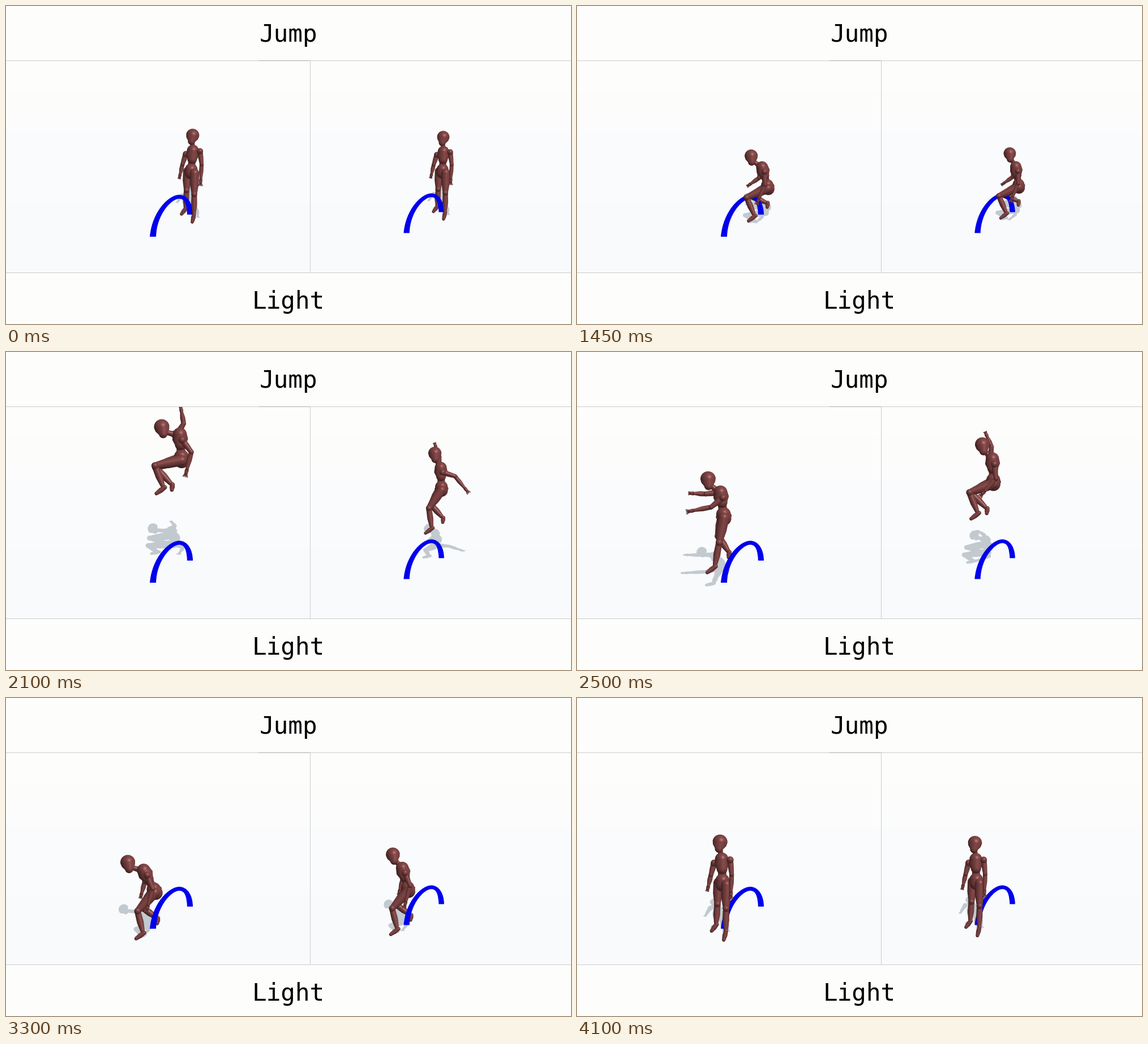
A matplotlib script for the animation above (4150 ms loop, 998 px wide and 561 px high).

```python
import numpy as np
import matplotlib.pyplot as plt
from matplotlib.animation import FuncAnimation
from matplotlib.patches import PathPatch
from matplotlib.path import Path

W, H, DPI = 998, 561, 100
FRAMES, STEP = 83, 50
TOP, BOTTOM, SPLIT = 96, 470, 537
WIN_W, WIN_H = 200, 345
SKIN = np.array([128, 69, 69]) / 255
SHADOW = np.array([194, 201, 207]) / 255
LIGHT = np.array([0.35, -0.55, 0.76])
HALF = np.array([0.19, -0.29, 0.94])
SQUASH = 0.92       # vertical foreshortening of the camera
THIGH, SHIN = 41, 39

# crouch (px), turn to the side, then angles in degrees from straight up,
# growing towards the left: spine, neck, near arm x2, far arm x2
POSES = np.array([
    (0, 0.0, -5, 0, 187, 177, 162, 167),     # stand
    (9, 0.9, 4, 14, 202, 162, 172, 170),     # turn
    (28, 1.0, 16, 40, 182, 157, 173, 125),   # crouch
    (0, 1.0, 4, 25, 262, 235, 20, 30),       # take off
    (0, 1.0, 4, 60, 212, 160, -30, 10),      # tuck
    (0, 1.0, 9, 36, 124, 98, 115, 100),      # land
    (15, 1.0, 28, 58, 202, 165, 190, 165),   # settle
    (0, 0.0, 2, 5, 186, 178, 165, 167),      # stand again
])


def v(x, y):
    return np.array([x, y], float)


def along(a, b, u):
    return a + (b - a) * u


def polar(deg, length):
    a = np.radians(deg)
    return -length * v(np.sin(a), np.cos(a))


def smooth_keys(times, rows, t):
    """Monotone cubic interpolation through the key rows."""
    times = np.asarray(times, float)
    d = np.diff(rows, axis=0) / np.diff(times)[:, None]
    a, b = d[:-1], d[1:]
    same = a * b > 0
    m = np.zeros_like(rows)
    m[1:-1] = np.where(same, 2 * a * b / np.where(same, a + b, 1), 0)
    i = min(np.searchsorted(times, t, "right") - 1, len(times) - 2)
    h = times[i + 1] - times[i]
    u = (t - times[i]) / h
    return ((1 + 2 * u) * (1 - u) ** 2 * rows[i] + u * (1 - u) ** 2 * h * m[i]
            + u * u * (3 - 2 * u) * rows[i + 1] + u * u * (u - 1) * h * m[i + 1])


def bend_knee(hip, ankle, thigh, shin):
    """Two-bone reach with the knee pointing forward (left)."""
    d = (ankle - hip) / (1, SQUASH)
    reach = np.hypot(*d)
    s = (thigh ** 2 - shin ** 2 + reach ** 2) / (2 * reach)
    if reach > thigh + shin:
        s = reach / 2
    off = np.sqrt(max(thigh ** 2 - s ** 2, 0)) if reach < thigh + shin else 0
    return hip + (d * s + v(-d[1], d[0]) * off) / reach * (1, SQUASH)


def leg(hip, ankle, toe, size, short=1):
    knee = bend_knee(hip, ankle, THIGH * size * short, SHIN * size * short)
    heel = along(ankle, ankle + toe, -0.15)
    return [(hip, knee, (8.2, 7.8, 4.8)),
            (knee, ankle, (4.8, 5.3, 2.9)),
            (knee, knee, (5.1,) * 3),
            (heel, ankle + toe, (3.3, 3.9, 2.8))]


def arm(shoulder, upper, fore, size, lengths):
    elbow = shoulder + polar(upper, lengths[0] * size)
    hand = elbow + polar(fore, lengths[1] * size)
    wrist, palm = along(elbow, hand, 0.68), along(elbow, hand, 0.84)
    d = hand - palm
    side = v(-d[1], d[0]) * 0.5
    fingers = [(palm, hand + side * k, (1.6, 1.4, 0.9)) for k in (-1, 0, 1)]
    return fingers + [(wrist, palm, (2.3, 3.0, 2.6)),
                      (elbow, wrist, (3.6, 3.8, 2.3)),
                      (shoulder, elbow, (4.8, 4.5, 3.5)),
                      (shoulder, shoulder, (5.4,) * 3)]


def trunk(pelvis, chest, head, chin):
    spine = pelvis - chest
    return [(chest, pelvis, (7, 6.5, 6.5)),
            (along(pelvis, chest, 0.08), pelvis + 0.12 * spine, (11, 12.2, 11)),
            (chest, along(chest, head, 0.35), (9.5, 8, 5)),
            (along(chest, head, 0.3), along(head, chin, 0.6), (4.2, 4, 4)),
            (chest - 0.16 * spine, chest + 0.32 * spine, (10.5, 11.8, 8.5)),
            (head, chin, (11.6, 10.4, 6.4))]


def paint(buf, a, b, radii, flat=None):
    """Composite one shaded tapered capsule into a premultiplied buffer."""
    pad = max(radii) + 2
    x0, y0 = np.maximum(np.floor(np.minimum(a, b) - pad), 0).astype(int)
    x1, y1 = np.minimum(np.ceil(np.maximum(a, b) + pad), (WIN_W, WIN_H)).astype(int)
    if x1 <= x0 or y1 <= y0:
        return
    y, x = np.mgrid[y0:y1, x0:x1] + 0.5
    d = b - a
    t = np.clip(((x - a[0]) * d[0] + (y - a[1]) * d[1]) / (d @ d + 1e-9), 0, 1)
    ox, oy = x - a[0] - t * d[0], y - a[1] - t * d[1]
    r = np.interp(t, [0, 0.5, 1], radii)
    dist = np.hypot(ox, oy)
    alpha = np.clip(r - dist + 0.5, 0, 1)[..., None]
    color = flat
    if flat is None:
        k = 1 / np.maximum(r, dist)
        n = np.stack([ox * k, oy * k], -1)
        nz = np.sqrt(np.clip(1 - (n ** 2).sum(-1, keepdims=True), 0, 1))
        n = np.concatenate([n, nz], -1)
        diffuse = np.clip(n @ LIGHT, 0, 1)[..., None]
        gloss = np.clip(n @ HALF, 0, 1)[..., None] ** 40
        color = np.clip(SKIN * (0.5 + 0.55 * diffuse) + 0.2 * gloss, 0, 1)
    part = buf[y0:y1, x0:x1]
    part *= 1 - alpha
    part[..., :3] += color * alpha
    part[..., 3:] += alpha


class Camera:
    def __init__(self, scale, offset):
        self.scale, self.offset = np.array(scale), np.array(offset)

    def __call__(self, p):
        return np.asarray(p) * self.scale + self.offset


class Jumper:
    """Mannequin that leaves the ground at `up` and lands at `down` (ms)."""

    def __init__(self, ax, cam, x0, up, down, height, slump):
        self.cam, self.up, self.down = cam, up, down
        self.height, self.slump = height, slump
        self.marks = [0, 800, 1450, up, (up + down) / 2, down, 3300, 4100]
        self.origin = v(x0, TOP + 1)
        box = (x0, x0 + WIN_W, TOP + 1 + WIN_H, TOP + 1)
        blank = np.zeros((WIN_H, WIN_W, 4))
        self.layers = [ax.imshow(blank, extent=box, aspect="auto", zorder=z,
                                 interpolation="nearest") for z in (3, 5)]

    def limbs(self, t):
        u = np.clip((t - self.up) / (self.down - self.up), 0, 1)
        travel = u * u * (3 - 2 * u)
        hop = self.height * 4 * u * (1 - u)
        tuck = np.sin(np.pi * u) ** 2
        size = 1 + 0.13 * travel + hop / 1000
        crouch, turn, lean, nod, *arms = smooth_keys(self.marks, POSES, t)

        root = v(327 - 70 * travel, 291 + 34 * travel - hop)
        pelvis = root + (0.35 * crouch + 14 * tuck, crouch)
        chest = pelvis + polar(lean * self.slump, 31 * size)
        head = chest + polar(nod * self.slump, 32 * size)
        chin = head + v(-2 + 0.07 * nod, 10.5) * size

        def joint(base, front, side):
            return base + along(v(*front), v(*side), turn) * size

        def foot(front, side, tucked):
            stance = along(v(*front), v(*side), turn)
            return root + along(stance, v(*tucked), tuck) * size

        far_leg = leg(joint(pelvis, (-6, 1), (-1, 0)),
                      foot((-10, 67), (10, 57), (-2, 40)),
                      along(v(-7, 9), v(-1, 7), turn) * size,
                      size, along(0.82, 1, tuck))
        near_leg = leg(joint(pelvis, (6, 4), (0, 3)),
                       foot((5, 78), (-13, 80), (-15, 44)),
                       along(v(-3, 12), v(-11, 8), turn) * size, size)
        far_arm = arm(joint(chest, (-12, 1), (-4, -5)), *arms[2:], size, (19, 26))
        near_arm = arm(joint(chest, (13, -4), (3, 3)), *arms[:2], size, (23, 38))
        body = trunk(pelvis, chest, head, chin)
        return far_leg, far_arm, body, near_leg, near_arm, size, 368 + 39 * travel

    def draw(self, t):
        far_leg, far_arm, body, near_leg, near_arm, size, floor = self.limbs(t)
        under, over = (np.zeros((WIN_H, WIN_W, 4)) for _ in range(2))
        zoom = size * self.cam.scale.mean()

        def put(buf, parts, shape=lambda p: p, scale=1, flat=None):
            for a, b, r in parts:
                ends = (self.cam(shape(p)) - self.origin for p in (a, b))
                paint(buf, *ends, np.array(r) * zoom * scale, flat)

        def cast(depth):
            def drop(p):
                rise = floor + depth - p[1]
                return v(p[0] - 0.06 * rise, floor + depth - 0.29 * rise)
            return drop

        for parts, depth in ((far_leg, -6), (far_arm, -4), (body, 0),
                             (near_leg, 14), (near_arm, 28)):
            put(under, parts, cast(depth), 0.7, SHADOW)
        put(under, far_leg + far_arm + body)
        put(over, near_leg + near_arm)
        for layer, buf in zip(self.layers, (under, over)):
            buf[..., :3] /= np.maximum(buf[..., 3:], 1e-6)
            layer.set_data(np.clip(buf, 0, 1))
        return self.layers


def add_arc(ax, cam):
    outer = [(254, 407), (258, 362), (288, 333), (306, 333),
             (321, 333), (330, 349), (330, 368)]
    inner = [(320, 368), (319, 350), (316, 340), (306, 340),
             (292, 340), (266, 368), (265, 407)]
    codes = [Path.MOVETO] + [Path.CURVE4] * 6 + [Path.LINETO] + [Path.CURVE4] * 6
    ax.add_patch(PathPatch(Path(cam(outer + inner), codes),
                           fc="#0000ec", lw=0, zorder=4))


fig = plt.figure(figsize=(W / DPI, H / DPI), dpi=DPI, facecolor="#fdfdfb")
ax = fig.add_axes([0, 0, 1, 1])

# floor haze
rows = np.arange(TOP, BOTTOM)
haze = np.stack([np.interp(rows, [150, 225, BOTTOM], c) for c in
                 ((253, 251, 249), (253, 252, 250), (251, 252, 252))], -1) / 255
ax.imshow(haze[:, None, :], extent=(0, W, BOTTOM, TOP), aspect="auto", zorder=0)

rule = dict(color="#c9cccf", lw=0.72, zorder=2)
ax.plot([0, W], [TOP - 0.5] * 2, **rule)
ax.plot([446, SPLIT], [TOP - 0.5] * 2, **{**rule, "color": "#a9acb0"})
ax.plot([0, W], [BOTTOM - 0.5] * 2, **rule)
ax.plot([SPLIT + 0.5] * 2, [TOP, BOTTOM], **rule)

for word, base in (("Jump", 63), ("Light", 534)):
    ax.text(W / 2, base, word, family="DejaVu Sans Mono", size=30.7,
            ha="center", va="baseline", color="black", zorder=6)

left_cam = Camera((1, 1), (0, 0))
right_cam = Camera((0.94, 0.946), (463.6, 15.5))
for cam in (left_cam, right_cam):
    add_arc(ax, cam)

jumpers = [Jumper(ax, left_cam, 180, 1700, 2570, 119, 1.0),
           Jumper(ax, right_cam, 640, 1950, 2810, 97, 0.55)]

ax.set_xlim(0, W)
ax.set_ylim(H, 0)
ax.axis("off")


def update(i):
    return [layer for j in jumpers for layer in j.draw(i * STEP)]


anim = FuncAnimation(fig, update, frames=FRAMES, interval=STEP,
                     repeat=True, repeat_delay=0, blit=False)
plt.show()
```
